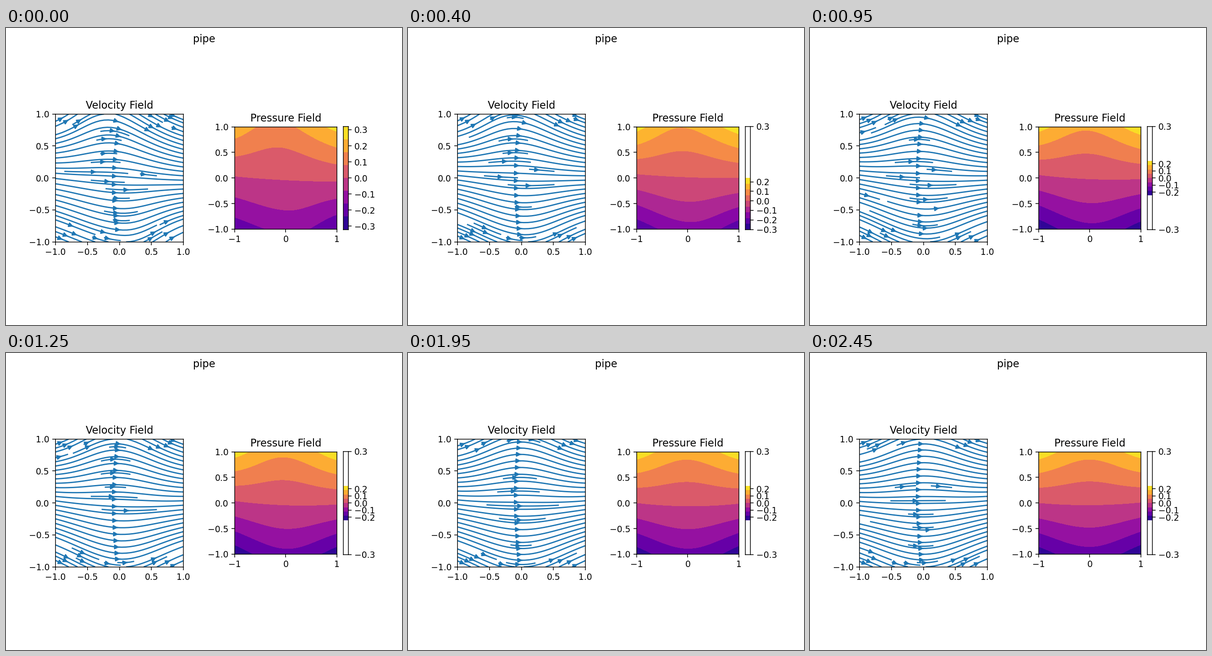
Recreate the animation shown at these times as a matplotlib script. Size 864 by 648 pixels, loop 2.5 s.

```python
import numpy as np
import matplotlib.pyplot as plt
from matplotlib.animation import FuncAnimation
from matplotlib.colorbar import make_axes_gridspec

W, H, DPI = 864, 648, 135
FRAMES, STEP = 50, 50
BAR_TICKS = np.arange(-3, 4) / 10

axis = np.linspace(-1, 1, 60)
X, Y = np.meshgrid(axis, axis)


def wave(t, mid, amp, peak, half):
    return mid + amp * np.cos(np.pi * (t - peak) / half)


def blend(left, mid, right, x):
    """Bell-shaped passage from the left value over the middle to the right."""
    f = (1 - np.cos(0.65 * np.pi * x)) / (1 - np.cos(0.65 * np.pi))
    return mid + f * (np.where(x < 0, left, right) - mid)


def pressure(t):
    start = np.exp(-t / 0.13)  # quick settling at the beginning
    skew = np.exp(-1.2 * t)    # slow loss of asymmetry

    # Height of the zero line, a parabola that sways at both ends and the middle
    left = wave(t, 0.04, 0.04, 0.4, 1.8) - 0.036 * start
    mid = wave(t, -0.01, 0.05, -1 / 6, 2) - 0.078 * start
    right = wave(t, 0, -0.025, 1.35, 1.6) - 0.09 * start
    zero = mid + (right - left) / 2 * X + ((left + right) / 2 - mid) * X**2

    xs = X + skew * (0.05 + 0.12 * Y) * (1 - X**2)
    d = Y - zero
    slope = blend(0.2, 0.1155 + 0.006 * t + 0.01 * start,
                  0.202 + 0.035 * start, xs)
    bend = blend(0.012 * skew, -0.0085, -0.006, xs)
    return d * (slope + bend * d + 0.015 * d**2)


def levels_at(t):
    step = 0.08 if t < 0.1 else 0.06
    lowest = -5 if 0.1 <= t < 0.5 else -4
    return np.arange(lowest, 5) * step


def bar_position(v, levels):
    """Place on the colour bar; values out of range land one length away."""
    lo, hi = levels[0], levels[-1]
    if v < lo - 1e-6:
        return -1
    if v > hi + 1e-6:
        return 2
    return (v - lo) / (hi - lo)


fig, (flow_ax, pres_ax) = plt.subplots(
    1, 2, figsize=(W / DPI, H / DPI), dpi=DPI, gridspec_kw={"wspace": 0.4})
fig.suptitle("pipe")
bar_ax, _ = make_axes_gridspec(pres_ax, shrink=0.45)
bar_ax.set_xticks([])
bar_ax.yaxis.tick_right()

for ax, title, gap in ((flow_ax, "Velocity Field", 0.5),
                       (pres_ax, "Pressure Field", 1)):
    ax.set_title(title)
    ax.set_aspect("equal")
    ax.set_xticks(np.arange(-1, 1.1, gap))
    ax.set_yticks(np.arange(-1, 1.1, 0.5))
    ax.set_xlim(-1, 1)
    ax.set_ylim(-1, 1)
pres_ax.xaxis.set_major_formatter("{x:.0f}")

shown = []


def draw_bar(levels):
    n = len(levels) - 1
    shades = (np.arange(n) + 0.5)[:, None] / n
    mesh = bar_ax.pcolormesh([0, 1], np.linspace(0, 1, n + 1), shades,
                             cmap="plasma", vmin=0, vmax=1)
    places = [bar_position(v, levels) for v in BAR_TICKS]
    labels = [f"{v:.1f}".replace("-", "\u2212") for v in BAR_TICKS]
    bar_ax.set_yticks(places, labels)
    bar_ax.set_xlim(0, 1)
    bar_ax.set_ylim(min(0, *places), max(1, *places))
    return mesh


def update(i):
    for artist in shown + list(flow_ax.patches):
        artist.remove()
    t = i * STEP / 1000
    p = pressure(t)
    levels = levels_at(t)

    # The flow follows the lines of equal pressure
    p_y, p_x = np.gradient(p, axis, axis)
    stream = flow_ax.streamplot(axis, axis, p_y, -p_x, color="C0")
    inside = np.clip(p, levels[0] + 1e-6, levels[-1] - 1e-6)
    field = pres_ax.contourf(X, Y, inside, levels=levels, cmap="plasma")
    shown[:] = [stream.lines, field, draw_bar(levels)]
    return shown


pres_ax.xaxis.set_major_formatter(
    lambda x, pos: f"{x:.0f}".replace("-", "\u2212"))
anim = FuncAnimation(fig, update, frames=FRAMES, interval=STEP,
                     init_func=lambda: [], repeat=True, repeat_delay=0)
plt.show()
```
